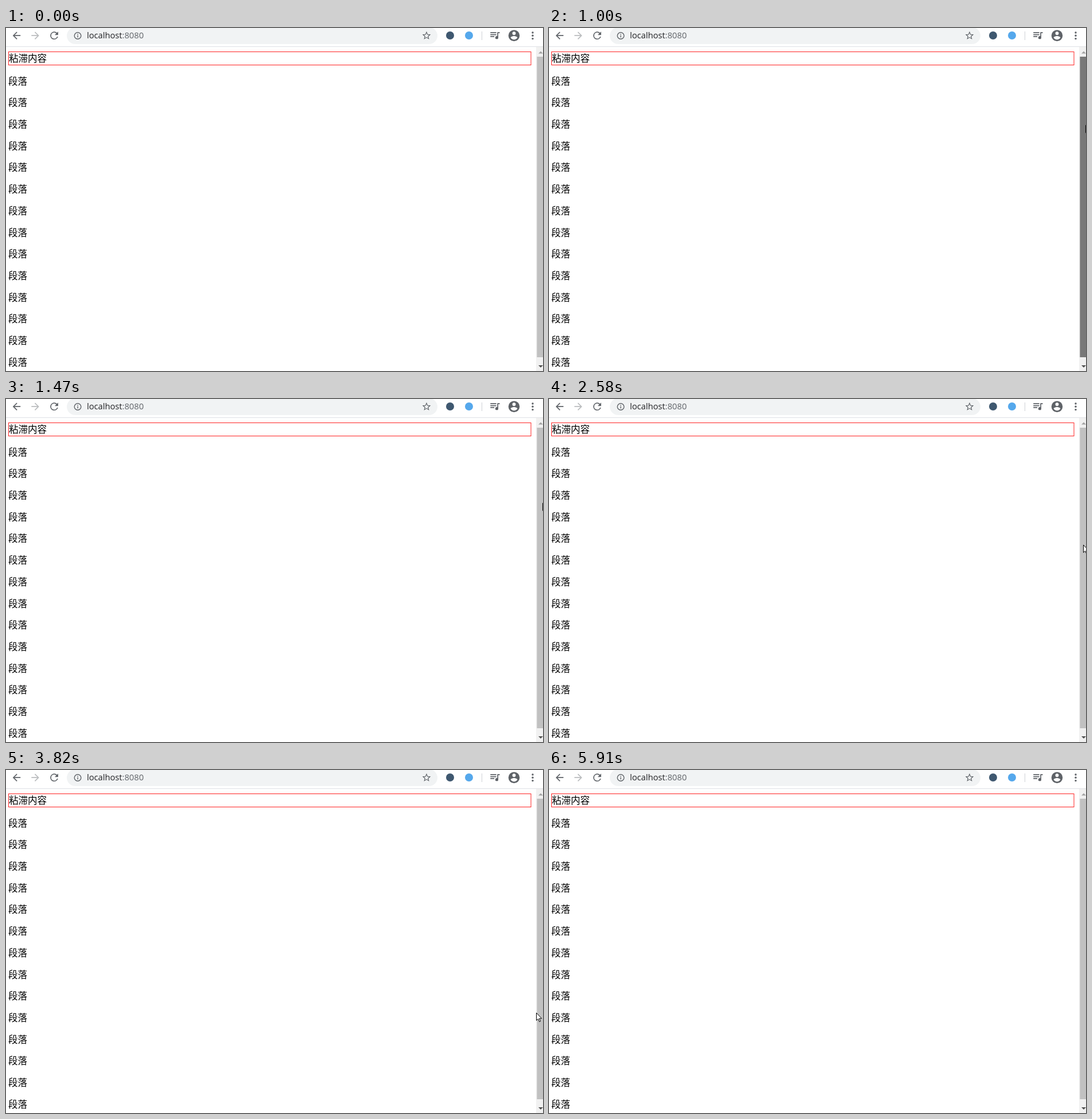
Write an HTML page that moves like this. It is 936 px wide and 598 px high and loops after 6690 ms.

```html
<!DOCTYPE html>
<html lang="zh-CN">
<head>
<meta charset="utf-8">
<title>粘滞内容</title>
<style>
  html, body { margin: 0; width: 100%; height: 100%; overflow: hidden; background: #fff; }
  svg { display: block; width: 936px; height: 598px; }
  .page text { font: 350 16.5px "Noto Sans CJK SC", "Noto Sans CJK", sans-serif; fill: #000; }
  .url { font: 14.7px "Open Sans", "Noto Sans", sans-serif; fill: #202124; }
</style>
</head>
<body>
<svg viewBox="0 0 936 598">
  <defs>
    <clipPath id="viewport"><rect y="33" width="924" height="565"/></clipPath>
  </defs>

  <g class="page" clip-path="url(#viewport)">
    <g id="content">
      <rect x="4.5" y="41.5" width="910.5" height="23" fill="none" stroke="#f22"/>
      <text x="5" y="59.2">粘滞内容</text>
    </g>
  </g>

  <rect x="924" y="33" width="12" height="565" fill="#f1f1f1"/>
  <rect id="thumb" x="925.4" width="10.6" height="524"/>
  <path id="up" d="M928 44.5h8l-4-4z"/>
  <path d="M928 588h8l-4 4z" fill="#505050"/>

  <rect y="32" width="936" height="1" fill="#dfe1e5"/>
  <rect x="106" y="-1" width="646" height="29" rx="14.5" fill="#f1f3f4"/>
  <g id="icons" fill="#5f6368">
    <circle cx="125" cy="13.5" r="5.8" fill="none" stroke="#5f6368" stroke-width="1.4"/>
    <path d="M124.3 12.8h1.4v3.6h-1.4zM124.3 10.3h1.4v1.4h-1.4z"/>
    <circle cx="774" cy="13" r="7" fill="#3f5870"/>
    <circle cx="807" cy="13" r="7" fill="#55a8ec"/>
    <rect x="829" y="6" width="1" height="15" fill="#d0d3d8"/>
    <circle cx="918" cy="8" r="1.7"/>
    <circle cx="918" cy="13.3" r="1.7"/>
    <circle cx="918" cy="18.6" r="1.7"/>
  </g>
  <text class="url" x="141" y="18.4">localhost<tspan fill="#5f6368">:8080</tspan></text>

  <path id="cursor" d="M.5.5v13.2l3-2.8 2.2 5 2-.9-2.2-4.8h4.2z" fill="#fff" stroke="#000"/>
</svg>
<script>
const LOOP = 6690;
const STEP = 78;
const SVG = "http://www.w3.org/2000/svg";
const $ = id => document.getElementById(id);

function add(parent, tag, attrs, text = "") {
  const el = document.createElementNS(SVG, tag);
  for (const name in attrs) el.setAttribute(name, attrs[name]);
  el.textContent = text;
  parent.append(el);
}

for (let i = 0; i < 14; i++) {
  add($("content"), "text", { x: 4, y: 98.7 + i * 37.69 }, "段落");
}

// Outlines on a 24-unit grid, placed by their centre
function icon(x, y, scale, d, fill = "#5f6368") {
  const transform = `translate(${x} ${y}) scale(${scale}) translate(-12 -12)`;
  add($("icons"), "path", { d, fill, transform });
}
icon(18.5, 13.2, .84, "M20 11H7.83l5.59-5.59L12 4l-8 8 8 8 1.41-1.41L7.83 13H20z");
icon(51, 13.2, .84, "M12 4l-1.41 1.41L16.17 11H4v2h12.17l-5.58 5.59L12 20l8-8z", "#babcbe");
icon(84, 13.2, .86, "M17.65 6.35A7.95 7.95 0 0 0 12 4a8 8 0 1 0 7.73 10h-2.08A6 6 0 1 1 12 6c1.66 0 3.14.69 4.22 1.78L13 11h7V4z");
icon(733, 13.2, .74, "M22 9.24l-7.19-.62L12 2 9.19 8.63 2 9.24l5.46 4.73L5.82 21 12 17.27 18.18 21l-1.63-7.03zM12 15.4l-3.76 2.27 1-4.28-3.32-2.88 4.38-.38L12 6.1l1.71 4.04 4.38.38-3.32 2.88 1 4.28z");
icon(852, 12.4, .86, "M15 6H3v2h12zm0 4H3v2h12zM3 16h8v-2H3zM17 6v8.18a3 3 0 1 0 2 2.82V8h3V6z");
icon(885.5, 13.2, .98, "M12 2a10 10 0 1 0 0 20a10 10 0 1 0 0-20zm0 3a3 3 0 1 1 0 6a3 3 0 1 1 0-6zm0 14.2c-2.5 0-4.71-1.28-6-3.22.03-1.99 4-3.08 6-3.08s5.97 1.09 6 3.08c-1.29 1.94-3.5 3.22-6 3.22z");

// Cursor way points: time, x, y
const GRAB_Y = 169;
const path = [
  [680, 935, 173], [830, 935, GRAB_Y], [1240, 935, GRAB_Y],
  [1470, 935, 181], [1940, 935, 195], [2580, 931, 254],
  [3270, 923, 380], [3500, 920, 408], [3570, 920, 408],
  [3820, 924, 423], [4810, 924, 423], [4890, 925, 428],
  [4980, 925, 428], [5680, 867, 468], [5830, 856, 560], [5910, 856, 560]
];

const within = (time, start, end) => time >= start && time < end;

// Moves between way points in even jumps of about one STEP
function cursorAt(time) {
  const next = path.findIndex(([start]) => start > time);
  if (next < 1) return null;
  const [t0, x0, y0] = path[next - 1];
  const [t1, x1, y1] = path[next];
  const count = Math.max(1, Math.round((t1 - t0) / STEP));
  const k = Math.floor((time - t0) / (t1 - t0) * count) / count;
  return { x: Math.round(x0 + (x1 - x0) * k), y: Math.round(y0 + (y1 - y0) * k) };
}

function thumbColor(time) {
  if (within(time, 1000, 1470)) return "#787878";
  return within(time, 70, 140) || within(time, 530, 1000) ? "#a8a8a8" : "#c1c1c1";
}

function draw(time) {
  const cursor = cursorAt(time);
  const scroll = within(time, 1000, 1470) ? Math.min(7, cursor.y - GRAB_Y) : 0;
  $("content").setAttribute("transform", `translate(0 ${-scroll})`);
  $("thumb").setAttribute("y", 50 + scroll);
  $("thumb").setAttribute("fill", thumbColor(time));
  $("up").setAttribute("fill", scroll ? "#505050" : "#a3a3a3");
  $("cursor").setAttribute("visibility", cursor ? "visible" : "hidden");
  if (cursor) $("cursor").setAttribute("transform", `translate(${cursor.x} ${cursor.y})`);
}

const begin = performance.now();
function tick() {
  draw((performance.now() - begin) % LOOP);
  requestAnimationFrame(tick);
}
tick();
</script>
</body>
</html>
```
